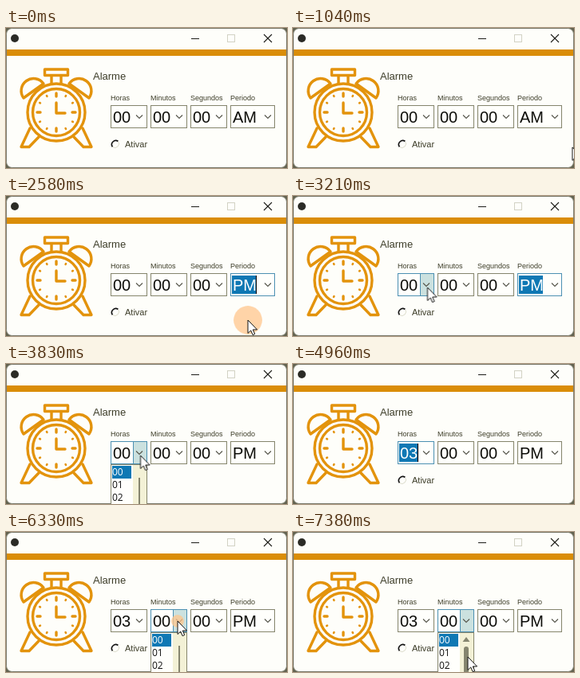
Animation of 352 by 176 pixels, one loop 8 s. Source, as an HTML page:

```html
<!DOCTYPE html>
<html lang="pt">
<head>
<meta charset="utf-8">
<title>Alarme</title>
<style>
html, body { margin: 0; width: 100%; height: 100%; overflow: hidden; background: #62624f; }
svg { display: block; width: 352px; height: 176px; }
text { font-family: "Liberation Sans", Arial, sans-serif; fill: #3c3c28; }
.small text { font-size: 9px; }
.value text { font-size: 20px; fill: #0c0c08; }
.list text { font: 12px "Open Sans", sans-serif; fill: #111; }
.pick rect { fill: #0f78b4; }
.value .pick text, .list .pick text { fill: #fff; }
.box { fill: #fffffc; stroke: #85856c; }
.lit { fill: #cbe1df; stroke: #4c90b2; }
.focus { fill: none; stroke: #4c90b2; }
.line { fill: none; stroke: #e3930c; stroke-width: 3.4; stroke-linecap: round; stroke-linejoin: round; }
.thumb { fill: #85856f; }

/* state switches */
.s { animation: 8s step-end infinite; }
@keyframes am      { 0% { opacity: 1 } 31.375%, 100% { opacity: 0 } }
@keyframes pm      { 0% { opacity: 0 } 31.375%, 100% { opacity: 1 } }
@keyframes pmPick  { 0%, 42.5%, 100% { opacity: 0 } 31.375% { opacity: 1 } }
@keyframes pmCaret { 0%, 40.125%, 100% { opacity: 0 } 31.375% { opacity: 1 } }
@keyframes perLit  { 0%, 31.375%, 100% { opacity: 0 } 16.3% { opacity: 1 } }
@keyframes perList { 0%, 31.375%, 100% { opacity: 0 } 17.25% { opacity: 1 } }
@keyframes amRow   { 0% { opacity: 1 } 21.5%, 100% { opacity: 0 } }
@keyframes pmRow   { 0% { opacity: 0 } 21.5%, 100% { opacity: 1 } }
@keyframes h00     { 0% { opacity: 1 } 61.95%, 100% { opacity: 0 } }
@keyframes h03     { 0% { opacity: 0 } 61.95%, 100% { opacity: 1 } }
@keyframes hPick   { 0%, 76%, 100% { opacity: 0 } 61.95% { opacity: 1 } }
@keyframes hCaret  { 0%, 72.4%, 100% { opacity: 0 } 61.95% { opacity: 1 } }
@keyframes hLit    { 0%, 61.95%, 100% { opacity: 0 } 39.4% { opacity: 1 } }
@keyframes hList   { 0%, 61.95%, 100% { opacity: 0 } 42.4% { opacity: 1 } }
@keyframes row0    { 0% { opacity: 1 } 51.1%, 100% { opacity: 0 } }
@keyframes row1    { 0%, 52%, 100% { opacity: 0 } 51.1% { opacity: 1 } }
@keyframes row2    { 0%, 53.2%, 100% { opacity: 0 } 52% { opacity: 1 } }
@keyframes mLit    { 0% { opacity: 0 } 72.6%, 100% { opacity: 1 } }
@keyframes mList   { 0% { opacity: 0 } 76%, 100% { opacity: 1 } }
@keyframes thin    { 0% { opacity: 1 } 82.5%, 100% { opacity: 0 } }
@keyframes thick   { 0% { opacity: 0 } 82.5%, 100% { opacity: 1 } }

/* pointer path and click halo */
.pointer { animation: move 8s ease-in-out infinite; }
@keyframes move {
  0%, .99% { transform: translate(-60px, -60px); }
  1% { transform: translate(48px, 16px); animation-timing-function: ease-in; }
  6.75% { transform: translate(353px, 155px); }
  12.9% { transform: translate(380px, 152px); }
  13% { transform: translate(350px, 150px); animation-timing-function: ease-out; }
  17.25%, 19.25% { transform: translate(328px, 120px); }
  22.9%, 33% { transform: translate(303px, 156px); }
  38.4% { transform: translate(152px, 113px); }
  39.6%, 48% { transform: translate(168.5px, 115px); }
  54.1%, 62.7% { transform: translate(150px, 186px); }
  71.9%, 72.4% { transform: translate(231px, 115px); }
  74%, 77.1% { transform: translate(218px, 103px); }
  79.1% { transform: translate(215px, 112px); }
  86% { transform: translate(218px, 172px); }
  92.25%, 100% { transform: translate(219px, 157px); }
}
.halo { fill: #ffc68c; opacity: .75; animation: click 8s linear infinite; }
@keyframes click {
  0%, 19.24%, 22.37%, 31.45%, 34.59%, 44.74%, 47.87%, 62.12%, 65.25%, 77.03%, 80.16%, 100% { transform: scale(0); }
  19.25%, 31.46%, 44.75%, 62.13%, 77.04% { transform: scale(1); }
}
</style>
</head>
<body>
<svg viewBox="0 0 352 176">
  <defs>
    <path id="chevron" d="M-4 -2L0 2L4 -2" fill="none" stroke="#55554a" stroke-width="1.1"/>
    <path id="bell" class="line" d="M22 88A15.4 15.4 0 0 1 47 70Z"/>
    <path id="leg" class="line" d="M30 126L19 149.5H29L41 137"/>
    <g id="ticks" class="line" stroke-width="3">
      <path d="M63 82V86" /><path d="M75 85.2L74.6 85.9M83.8 94L83.1 94.4" stroke-width="2.6"/>
    </g>
    <rect id="box" class="box" x=".5" y="97.5" width="45" height="28"/>
    <g id="lit"><rect class="focus" x=".5" y="97.5" width="45" height="28"/><rect class="lit" x="28.5" y="97.5" width="17" height="28"/></g>
    <g id="panel"><rect class="box" x=".5" y="126.5" width="45" height="60"/><rect x="28" y="127" width="17" height="50" fill="#f3f1d6"/></g>
  </defs>

  <!-- window -->
  <rect x=".5" y=".5" width="351" height="175" rx="7" fill="#fefefa" stroke="#7c7c6c"/>
  <circle cx="11" cy="13" r="5" fill="#2b2b26"/>
  <path d="M232 13.5H242M323 8L333 18M333 8L323 18" stroke="#1c1c18" stroke-width="1.1"/>
  <rect x="277.5" y="8.5" width="9" height="9" fill="none" stroke="#d2d2c4"/>
  <rect x="1" y="27" width="350" height="8" fill="#da8d08"/>

  <!-- alarm clock -->
  <use href="#bell"/><use href="#bell" transform="matrix(-1 0 0 1 126 0)"/>
  <use href="#leg"/><use href="#leg" transform="matrix(-1 0 0 1 126 0)"/>
  <g class="line">
    <rect x="48.5" y="52" width="29" height="7.5"/>
    <path d="M57 60V69M69 60V69M63 94V107H74"/>
    <circle cx="63" cy="106" r="36" fill="#fefefa"/>
    <circle cx="63" cy="106" r="29.5"/>
    <path d="M63 94V107H74"/>
  </g>
  <use href="#ticks"/>
  <use href="#ticks" transform="rotate(90 63 106)"/>
  <use href="#ticks" transform="rotate(180 63 106)"/>
  <use href="#ticks" transform="rotate(270 63 106)"/>

  <!-- labels -->
  <text x="109" y="65" font-size="13">Alarme</text>
  <g class="small">
    <text x="131" y="91">Horas</text><text x="181" y="91">Minutos</text>
    <text x="231" y="91">Segundos</text><text x="281" y="91">Periodo</text>
  </g>
  <path d="M133.5 149.5A5 5 0 0 1 140.5 142.5" fill="none" stroke="#111" stroke-width="1.6"/>
  <path d="M140.5 142.5A5 5 0 0 1 133.5 149.5" fill="none" stroke="#dcdccc"/>
  <text x="149" y="150" font-size="11">Ativar</text>

  <!-- comboboxes -->
  <use href="#box" x="131"/><use href="#box" x="181"/><use href="#box" x="231"/>
  <rect class="box" x="281.5" y="97.5" width="55" height="28"/>
  <g class="s" style="animation-name:hLit"><use href="#lit" x="131"/></g>
  <g class="s" style="animation-name:mLit"><use href="#lit" x="181"/></g>
  <g class="s" style="animation-name:perLit">
    <rect class="focus" x="281.5" y="97.5" width="55" height="28"/>
    <rect class="lit" x="320.5" y="97.5" width="16" height="28"/>
  </g>
  <use href="#chevron" x="167" y="111.5"/><use href="#chevron" x="217" y="111.5"/>
  <use href="#chevron" x="267" y="111.5"/><use href="#chevron" x="328" y="111.5"/>

  <g class="value">
    <text class="s" style="animation-name:h00" x="134" y="119">00</text>
    <text class="s" style="animation-name:h03" x="134" y="119">03</text>
    <text x="184" y="119">00</text>
    <text x="234" y="119">00</text>
    <text class="s" style="animation-name:am" x="284" y="119">AM</text>
    <text class="s" style="animation-name:pm" x="284" y="119">PM</text>
    <g class="pick s" style="animation-name:hPick">
      <rect class="focus" x="131.5" y="97.5" width="45" height="28" style="fill:none"/>
      <rect x="133" y="100" width="23" height="23"/><text x="134" y="119">03</text>
    </g>
    <g class="pick s" style="animation-name:pmPick">
      <rect class="focus" x="281.5" y="97.5" width="55" height="28" style="fill:none"/>
      <rect x="283" y="100" width="30" height="23"/><text x="284" y="119">PM</text>
    </g>
    <rect class="s" style="animation-name:hCaret" x="156" y="100" width="1" height="23"/>
    <rect class="s" style="animation-name:pmCaret" x="313" y="100" width="1" height="23"/>
  </g>

  <!-- drop-down lists -->
  <g class="list">
    <g class="s" style="animation-name:perList">
      <rect class="box" x="281.5" y="126.5" width="55" height="34"/>
      <text x="283" y="140">AM</text><text x="283" y="156">PM</text>
      <g class="pick s" style="animation-name:amRow"><rect x="283" y="128" width="52" height="16"/><text x="283" y="140">AM</text></g>
      <g class="pick s" style="animation-name:pmRow"><rect x="283" y="144" width="52" height="16"/><text x="283" y="156">PM</text></g>
    </g>
    <g class="s" style="animation-name:hList">
      <use href="#panel" x="131"/>
      <text x="133" y="140">00</text><text x="133" y="156">01</text><text x="133" y="172">02</text>
      <rect class="thumb" x="166" y="143" width="2" height="33"/>
      <g class="pick s" style="animation-name:row0"><rect x="133" y="128" width="24" height="16"/><text x="133" y="140">00</text></g>
      <g class="pick s" style="animation-name:row1"><rect x="133" y="144" width="24" height="16"/><text x="133" y="156">01</text></g>
      <g class="pick s" style="animation-name:row2"><rect x="133" y="160" width="24" height="16"/><text x="133" y="172">02</text></g>
    </g>
    <g class="s" style="animation-name:mList">
      <use href="#panel" x="181"/>
      <text x="183" y="156">01</text><text x="183" y="172">02</text>
      <g class="pick"><rect x="183" y="128" width="24" height="16"/><text x="183" y="140">00</text></g>
      <rect class="thumb s" style="animation-name:thin" x="216" y="143" width="2" height="33"/>
      <g class="thumb s" style="animation-name:thick">
        <path d="M217 132L221.5 138H212.5Z"/><rect x="214" y="144" width="6" height="40" rx="3"/>
      </g>
    </g>
  </g>

  <g class="pointer">
    <circle class="halo" r="24"/>
    <path d="M0 0V16.5L3.7 13L6.1 18.6L8.7 17.5L6.3 12H11.6Z" fill="#fff" stroke="#111"/>
  </g>
</svg>
</body>
</html>
```
